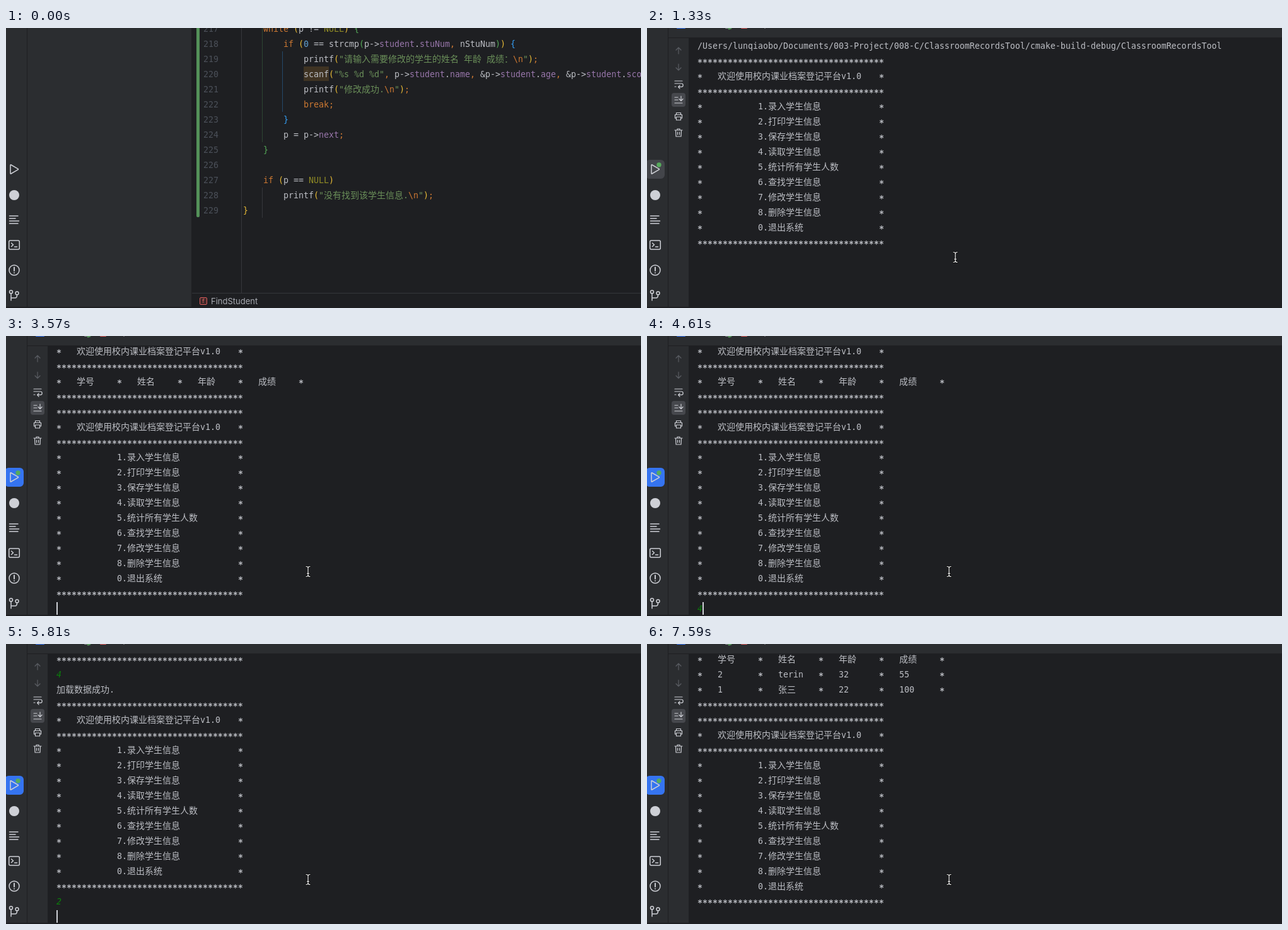
Recreate the animation shown at these times as an HTML page. Size 1007 by 444 pixels, loop 8000 ms.

```html
<!DOCTYPE html>
<html lang="zh-CN">
<head>
<meta charset="utf-8">
<title>Console session</title>
<style>
  html, body { margin: 0; width: 100%; height: 100%; overflow: hidden; background: #1e1f22; }
  #stage { position: relative; width: 1007px; height: 444px; overflow: hidden; background: #1e1f22; }
  #stage div, #stage svg { position: absolute; }
  #stage svg { left: 0; top: 0; fill: none; stroke: #ced0d6; stroke-width: 1.5; stroke-linecap: round; stroke-linejoin: round; }
  .pane { background: #2b2d30; }
  .mono { font: 13.29px/25px "DejaVu Sans Mono", "Noto Sans Mono", monospace; color: #bcbec4; white-space: pre; }
  .zh { font: 14px/0 "Noto Sans CJK SC", "Noto Sans CJK", "Noto Sans", sans-serif; }
  .star { font-weight: 700; line-height: 0; position: relative; top: 2px; }
  .typed { color: #0b800b; font-style: italic; }
  .key { color: #cc7832; }
  .str { color: #6a8f59; }
  .num { color: #5f9fd0; }
  .mac { color: #908b25; }
  .fld { color: #9876aa; }
  .r0 { color: #e8ba36; }
  .r1 { color: #54a857; }
  .r2 { color: #359ff4; }
  .no { color: #4b5059; }
  #editor, #run { inset: 0; }
  #view { left: 66px; top: 16px; width: 941px; height: 428px; overflow: hidden; }
  #log { left: 14px; top: 0; }
  #caret { width: 2px; height: 20px; background: #ced0d6; }
  #crumb { left: 325px; top: 423px; font: 13px/20px Inter, sans-serif; color: #a8abb2; }
  #badge { left: 307px; top: 427px; width: 10px; height: 10px; border: 1px solid #db5c5c; border-radius: 2px;
    background: #402929; color: #e46a6a; font: 9px/10px Inter, sans-serif; text-align: center; }
</style>
</head>
<body>
<div id="stage">
  <div id="editor">
    <div class="pane" style="left:34px;top:0;width:260px;height:442px"></div>
    <div style="left:302px;top:-6px;width:5px;height:306px;border-radius:2px;background:#549159"></div>
    <div style="left:373px;top:0;width:1px;height:420px;background:#35373b"></div>
    <div style="left:406px;top:0;width:1px;height:181px;background:#2d4632"></div>
    <div style="left:438px;top:37px;width:1px;height:96px;background:#25486a"></div>
    <div style="left:406px;top:253px;width:1px;height:48px;background:#35373b"></div>
    <div style="left:472px;top:61px;width:40px;height:23px;background:#3f3323"></div>
    <div id="code"></div>
    <div style="left:295px;top:420px;width:712px;height:1px;background:#35373b"></div>
    <div id="badge">f</div>
    <div id="crumb">FindStudent</div>
  </div>

  <div id="run">
    <div class="pane" style="left:34px;top:0;width:973px;height:15px"></div>
    <div class="pane" style="left:34px;top:16px;width:32px;height:426px"></div>
    <div id="view"><div id="log"><div id="caret"></div></div></div>
    <svg width="1007" height="444">
      <path d="M48 0H60" stroke="#3574f0" stroke-width="2"/>
      <g id="active" stroke-width="2">
        <path d="M125 0H128" stroke="#8b8e94"/>
        <path d="M130 1L133 0" stroke="#57965c" stroke-width="3"/>
        <path d="M150 0H158" stroke="#db5c5c"/>
      </g>
      <path d="M187 0v.1"/>
      <rect x="39" y="103" width="22" height="22" rx="4" fill="#46484d" stroke="none"/>
      <g stroke-width="1.2">
        <path d="M50 41V31M46 35L50 31L54 35M50 57V67M46 63L50 67L54 63" stroke="#5a5d63"/>
        <path d="M44 84H56M44 88H54.5a2.7 2.7 0 0 1 0 5.4H50M52 91L49.5 93.4L52 96M44 93H46"/>
        <path d="M44 110H49M44 114H49M44 119H56M54 108V115M51 112.5L54 115.5L57 112.5"/>
        <path d="M46.5 137.500V134.500H53.500V137.500M46.500 143H44.500V137.500H55.500V143H53.500M46.500 141H53.500V146H46.500Z"/>
        <path d="M44 162H56M48 162V160H52V162M45.500 162L46 172H54L54.500 162M48.500 165V169M51.500 165V169"/>
      </g>
    </svg>
  </div>

  <div class="pane" style="left:0;top:0;width:33px;height:442px"></div>
  <svg width="1007" height="444">
    <rect id="tab" x="-2" y="209" width="30" height="30" rx="6" stroke="none"/>
    <path d="M7 217.500V230.500Q7 231.500 8 231L19 224.700Q20 224 19 223.300L8 217Q7 216.500 7 217.500Z"/>
    <circle id="dot" cx="19" cy="217" r="3.700" fill="#57ab5c" stroke="none"/>
    <circle cx="13" cy="265" r="8" fill="#ced0d6" stroke="none"/>
    <path d="M5.500 298H19M5.500 302H15M5.500 306H20.500M5.500 310H19"/>
    <rect x="4.700" y="337" width="16.600" height="14" rx="2"/>
    <path d="M8.500 341L11.500 343.700L8.500 346.500M13.500 347H17.500"/>
    <circle cx="13" cy="384" r="8"/>
    <path d="M13 379.500V385M13 388.200v.1" stroke-width="1.900"/>
    <circle cx="8" cy="418.500" r="2.500"/>
    <circle cx="17.500" cy="420.500" r="2.500"/>
    <path d="M8 421V432M8 428H14.500Q17.500 428 17.500 423"/>
    <defs><path id="beam" d="M-3 -8Q0 -8 0 -5.500Q0 -8 3 -8M0 -6V6M-3 8Q0 8 0 5.500Q0 8 3 8M-1.500 3H1.500"/></defs>
    <g id="mouse">
      <use href="#beam" stroke="#111" stroke-width="3"/>
      <use href="#beam" stroke="#f2f2f2" stroke-width="1.200"/>
    </g>
  </svg>
</div>

<script>
const $ = id => document.getElementById(id);
const LOOP = 8000, ROW = 24, CH = 8;

// Adds text to a parent, wrapping Chinese runs and asterisks in their own styles.
function write(parent, text, cls) {
  const box = document.createElement('span');
  if (cls) box.className = cls;
  for (const part of text.split(/([\u3000-\u9fff\uff00-\uffef]+|\*+)/)) {
    if (!part) continue;
    const run = document.createElement('span');
    run.textContent = part;
    if (part[0] === '*') run.className = 'star';
    else if (part.charCodeAt(0) >= 0x3000) run.className = 'zh';
    box.append(run);
  }
  parent.append(box);
}

function cell(parent, left, top, cls = '') {
  const el = document.createElement('div');
  el.className = 'mono ' + cls;
  el.style.left = left + 'px';
  el.style.top = top + 'px';
  parent.append(el);
  return el;
}

// Editor
const source = String.raw`    while (p != NULL) {
        if (0 == strcmp(p->student.stuNum, nStuNum)) {
            printf("请输入需要修改的学生的姓名 年龄 成绩：\n");
            scanf("%s %d %d", p->student.name, &p->student.age, &p->student.score);
            printf("修改成功.\n");
            break;
        }
        p = p->next;
    }

    if (p == NULL)
        printf("没有找到该学生信息.\n");
}`;
const token = /(?<str>(?<=\\n)"|"[^"\\]*"?)|(?<key>\\n|\b(?:while|if|break)\b|[;,])|(?<mac>NULL)|(?<num>\b0\b)|(?<fld>(?<=->|\.)\w+)|(?<br>[(){}])|[\s\S]/g;
let curly = 1, round = 0;

function bracket(c) {
  if (c === '{') return 'r' + curly++;
  if (c === '}') return 'r' + --curly;
  return 'r' + (c === '(' ? round++ : --round);
}

source.split('\n').forEach((line, i) => {
  const top = i * ROW - 11;
  write(cell($('code'), 313, top, 'no'), String(217 + i));
  const row = cell($('code'), 376, top);
  for (const m of line.matchAll(token)) {
    const kind = Object.keys(m.groups).find(k => m.groups[k]);
    write(row, m[0], kind === 'br' ? bracket(m[0]) : kind);
  }
});

// Console
const rule = [[0, '*'.repeat(37)]];
const title = [[0, '*'], [4, '欢迎使用校内课业档案登记平台v1.0'], [36, '*']];
const items = ['1.录入学生信息', '2.打印学生信息', '3.保存学生信息', '4.读取学生信息', '5.统计所有学生人数',
  '6.查找学生信息', '7.修改学生信息', '8.删除学生信息', '0.退出系统'];
const menu = [rule, title, rule, ...items.map(s => [[0, '*'], [12, s], [36, '*']]), rule];
const record = (...v) => [[0, '*'], ...v.flatMap((s, i) => [[4 + 12 * i, s], [12 + 12 * i, '*']])];
const table = (...rows) => [rule, title, rule, record('学号', '姓名', '年龄', '成绩'), ...rows, rule];
const typed = s => [[0, s, 'typed']];

const project = 'ClassroomRecordsTool';
const lines = [
  [[0, `/Users/lunqiaobo/Documents/003-Project/008-C/${project}/cmake-build-debug/${project}`]],
  ...menu,
  typed('2'), ...table(), ...menu,
  typed('4'), [[0, '加载数据成功.']], ...menu,
  typed('2'), ...table(record('2', 'terin', '32', '55'), record('1', '张三', '22', '100')), ...menu
];
const rows = lines.map((parts, i) => {
  const row = document.createElement('div');
  row.style.top = i * ROW + 'px';
  $('log').append(row);
  for (const [col, text, cls] of parts) write(cell(row, col * CH, 0, cls), text);
  return row;
});

// Each track lists [start time, value]; values hold until the next entry.
const tracks = {
  open: [[0, false], [590, true]],
  tab: [[0, 'none'], [740, '#43454a'], [1630, '#3574f0']],
  active: [[0, false], [1040, true]],
  mouse: [[0, null], [1330, [489, 363.5]], [1480, [479, 373.5]]],
  count: [[0, 0], [1040, 1], [1190, 14], [2830, 15], [3430, 33], [4610, 34], [4910, 48], [5660, 49], [5960, 69]],
  scroll: [[0, 0], [3430, 208], [3570, 388], [4760, 412], [4910, 592], [5060, 748], [5810, 772], [5960, 1028], [6100, 1252]],
  caret: [[0, null], [1630, [14, 0]], [2230, null], [2680, [14, 0]], [2830, [14, 1]], [3280, [15, 0]], [3430, null],
    [3570, [33, 0]], [4170, null], [4610, [33, 1]], [4760, [34, 0]], [4910, null],
    [5060, [48, 0]], [5660, [48, 1]], [5810, [49, 0]], [5960, null],
    [6100, [69, 0]], [6700, null], [7140, [69, 0]], [7590, null]]
};
const at = (name, t) => tracks[name].findLast(([start]) => start <= t)[1];
const show = (el, on) => { el.style.display = on ? '' : 'none'; };

function draw(t) {
  const open = at('open', t), active = at('active', t);
  show($('editor'), !open);
  show($('run'), open);
  show($('active'), active);
  show($('dot'), active);
  $('tab').style.fill = at('tab', t);

  const mouse = at('mouse', t);
  show($('mouse'), mouse);
  if (mouse) $('mouse').setAttribute('transform', `translate(${mouse})`);

  const count = at('count', t);
  rows.forEach((row, i) => show(row, i < count));
  $('log').style.transform = `translateY(${-at('scroll', t)}px)`;

  const caret = at('caret', t);
  show($('caret'), caret);
  if (caret) {
    $('caret').style.top = caret[0] * ROW + 2 + 'px';
    $('caret').style.left = caret[1] * CH + 'px';
  }
}

const begin = performance.now();
function tick() {
  draw((performance.now() - begin) % LOOP);
  requestAnimationFrame(tick);
}
tick();
</script>
</body>
</html>
```
